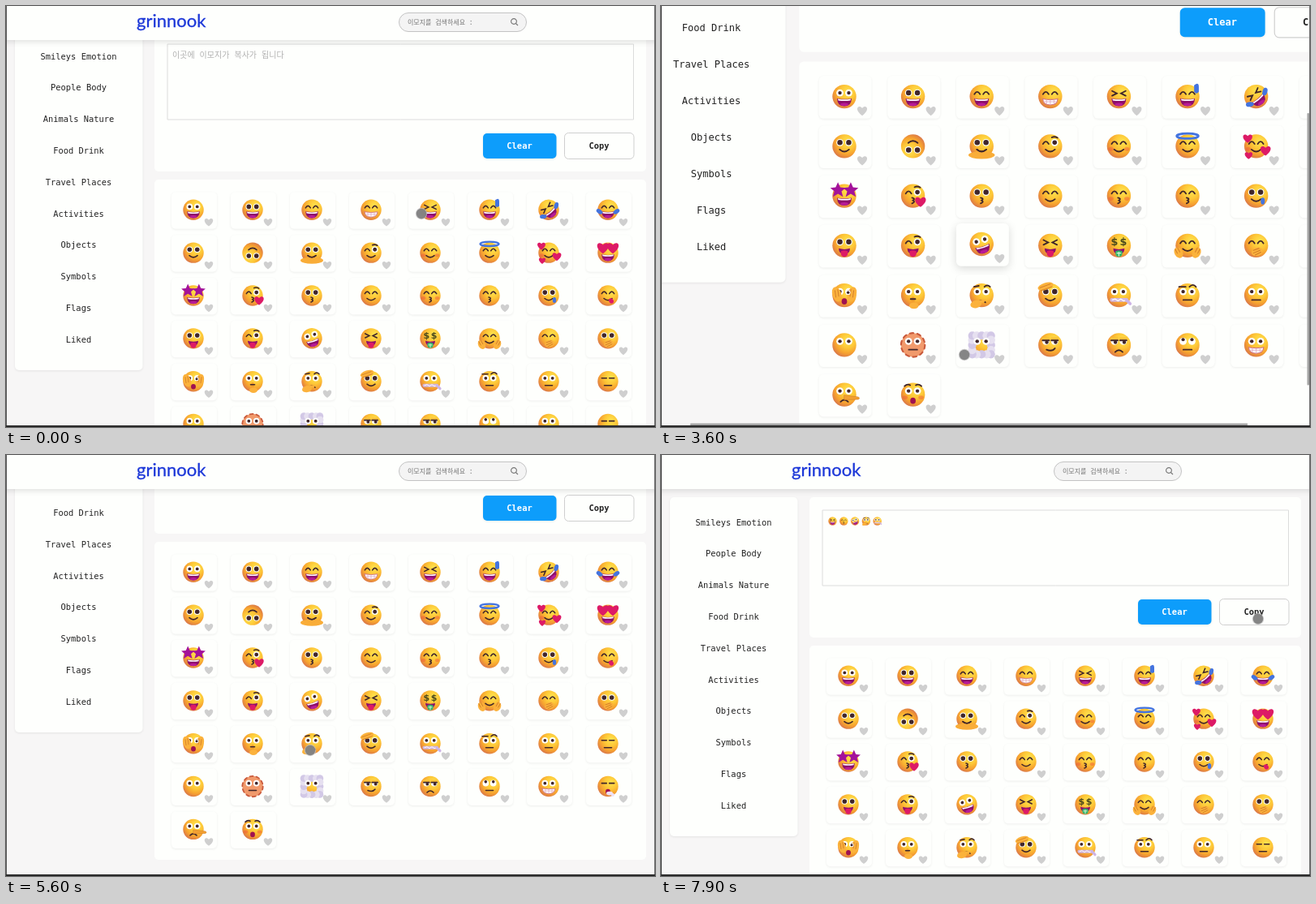
Animation of 800x519 px, one loop 8 s. Source, as an HTML page with a canvas:

```html
<!DOCTYPE html>
<html lang="ko">
<head>
<meta charset="utf-8">
<style>
html, body { margin: 0; width: 100%; height: 100%; overflow: hidden; background: #f7f6f6; }
canvas { display: block; }
</style>
</head>
<body>
<canvas id="stage" width="800" height="519"></canvas>
<script>
const ctx = document.getElementById('stage').getContext('2d');
const LOOP = 8000, MAX_SCROLL = 128, PAGE_HEIGHT = 647;
const INK = '#40262a', PAPER = '#fefffd', PINK = '#dd1a66', BLUE = '#4474df', HAND = '#fbb23c';
const MOUTH = '#8d0f6b', CREASE = '#cf7a28';
const MONO = '"DejaVu Sans Mono", "Noto Sans CJK KR", monospace';
const HEART = 'M0 5C-10 -2 -4 -8 0 -3.2C4 -8 10 -2 0 5Z';
const STAR = 'M0 -6L1.8 -2L6 -1.6L2.8 1.2L4 5.5L0 3L-4 5.5L-2.8 1.2L-6 -1.6L-1.8 -2Z';
const MENU = ['Smileys Emotion', 'People Body', 'Animals Nature', 'Food Drink', 'Travel Places',
  'Activities', 'Objects', 'Symbols', 'Flags', 'Liked'];

// Each face: eyes, mouth, then any extras.
const FACES = ('Wg Dg Ag At Xg Agd Xgrj Agj ' +
  'Ds Dsu Dsm Ks Asb Ash Asbe Hg ' +
  'Sg Kkl Dk As Akb Ak Dst Ay ' +
  'DT KT Wgi XT MG Asa Anc Dnc ' +
  'Wop Wnf Wrq Dsv Wz Wfw Wf Lf ' +
  'Wn WfD WnC Vm Vr Uf Wt Lox ' +
  'WrN WoB').split(' ');

// [time, zoom, x, y] of the view and [time, x, y] of the pointer
const VIEW = [[0, 1, 0, 21], [500, 1, 0, 21], [800, 1, 0, 0], [3150, 1, 0, 0], [3350, 1, 0, 128],
  [3600, 1.159, 36, 176], [4100, 1.199, 43.4, 213], [4700, 1.199, 43.4, 213], [5200, 1, 0, 128],
  [7140, 1, 0, 128], [7190, 1, 0, 0]];
const POINTER = [[0, 512, 256], [900, 512, 256], [1200, 600, 364], [1450, 595, 376], [1850, 595, 376],
  [2400, 374, 430], [4000, 374, 430], [4550, 419, 362], [5100, 419, 362], [5550, 375, 364],
  [6000, 375, 364], [6500, 521, 360], [6850, 521, 360], [7200, 648, 245], [7700, 736, 202]];
const PICKS = [[400, 4], [1500, 21], [2600, 26], [5700, 34], [6700, 36]];
const HOVERS = [[300, 1350, 4], [1350, 2050, 21], [2300, 4200, 26], [5600, 6100, 34], [6450, 6950, 36]];
const SCROLLING = [[500, 1500], [3150, 4300], [7050, 7750]];

function track(keys, t) {
  const i = keys.findIndex(k => k[0] > t);
  if (i < 0) return keys.at(-1).slice(1);
  const a = keys[i - 1], b = keys[i], u = (t - a[0]) / (b[0] - a[0]), e = u * u * (3 - 2 * u);
  return a.slice(1).map((v, j) => v + (b[j + 1] - v) * e);
}
const pulse = (t, a, b) => Math.max(0, Math.min(1, (t - a) / 150, (b - t) / 150));

const paths = {};
function path(d, fill, stroke, width = 1.6) {
  const p = paths[d] ??= new Path2D(d);
  if (fill) { ctx.fillStyle = fill; ctx.fill(p); }
  if (stroke) { ctx.strokeStyle = stroke; ctx.lineWidth = width; ctx.stroke(p); }
}
const line = d => path(d, null, INK);
function oval(x, y, rx, ry, fill, angle = 0) {
  ctx.beginPath();
  ctx.ellipse(x, y, rx, ry, angle, 0, 7);
  ctx.fillStyle = fill;
  ctx.fill();
}
const dot = (x, y, r, fill) => oval(x, y, r, r, fill);
function at(x, y, draw, scale = 1, angle = 0) {
  ctx.save();
  ctx.translate(x, y);
  ctx.rotate(angle);
  ctx.scale(scale, scale);
  draw();
  ctx.restore();
}
function box(x, y, w, h, r, fill, stroke, shadow = 0, drop = 1, depth = .08) {
  ctx.save();
  ctx.beginPath();
  ctx.roundRect(x, y, w, h, r);
  ctx.fillStyle = fill;
  if (shadow) Object.assign(ctx, { shadowColor: `rgba(0,0,0,${depth})`, shadowBlur: shadow, shadowOffsetY: drop });
  ctx.fill();
  ctx.restore();
  if (stroke) { ctx.strokeStyle = stroke; ctx.lineWidth = 1; ctx.stroke(); }
}
function text(s, x, y, font, color, align = 'center') {
  Object.assign(ctx, { font, fillStyle: color, textAlign: align, textBaseline: 'alphabetic' });
  ctx.fillText(s, x, y);
}
const heart = (x, y, scale, color = PINK) => at(x, y, () => path(HEART, color), scale);
const ball = (r, dx = 0, dy = 0) => { dot(0, 0, 3.8, '#fff'); dot(dx, dy, r, INK); };
const arcEye = () => line('M-3 1.5Q0 -3.5 3 1.5');

const EYES = {
  W: () => ball(1.9),
  D: () => ball(2.8),
  A: arcEye,
  X: x => line(x < 0 ? 'M-2.5 -2L2.5 .5L-2.5 3' : 'M2.5 -2L-2.5 .5L2.5 3'),
  K: x => x < 0 ? arcEye() : (ball(2.4), line('M-3 -5.5Q0 -7 3 -5')),
  H: x => heart(x * .3, -1.5, 1.3),
  S: x => at(x * .45, -2.5, () => path(STAR, '#a3129a'), 1.35),
  M: () => text('$', 0, 4, 'bold 11px "DejaVu Sans", sans-serif', '#4d4a1c'),
  L: () => line('M-3 0L3 0'),
  V: () => { ball(1.9, 1, 1); path('M-4.2 -4.2H4.2V-.8H-4.2Z', '#fbc23a'); line('M-3.5 -1H3.5'); },
  U: () => ball(1.8, 0, -1.8)
};
const tongue = color => {
  path('M-6 3Q0 5 6 3Q6 9 0 9Q-6 9 -6 3Z', MOUTH);
  path('M-3.6 6Q0 4 3.6 6V9Q3 12 0 12Q-3 12 -3.6 9Z', color);
};
const MOUTHS = {
  g() {
    path('M-7.8 2Q0 3.6 7.8 2Q7.5 10.3 0 10.3Q-7.5 10.3 -7.8 2Z', MOUTH);
    path('M-7 2.4Q0 4 7 2.4L6.4 4.2Q0 5.2 -6.4 4.2Z', '#fff');
    oval(0, 8.4, 4.2, 1.7, '#b81a98');
  },
  t() {
    path('M-8 2.5Q0 4 8 2.5Q7.5 9 0 9Q-7.5 9 -8 2.5Z', '#fff', '#d0707c', .9);
    path('M-7 5.5H7M-4 3V8M0 3.5V9M4 3V8', null, '#dba3bb', .7);
  },
  s: () => line('M-5 3.5Q0 8 5 3.5'),
  k: () => line('M-1 2Q3 3 0 4.8Q3 6.5 -1 8'),
  T: () => tongue(PINK),
  G() { tongue('#35b56a'); path('M-2 8H2M0 7V11', null, '#d6f5d8', 1); },
  f: () => line('M-4.5 5H4.5'),
  r: () => line('M-4 7.5Q0 3.5 4 7.5'),
  m: () => line('M-4 5Q2 7.5 5 3.5'),
  y() { MOUTHS.s(); oval(4, 6.5, 2.8, 3.3, PINK, -.5); },
  z() {
    path('M-7.5 5H8', null, '#d3b6dc', 4);
    path('M-7 5L-4 4L-1 6L2 4L5 6L8 5', null, '#fff', 1);
    path('M8 5L12 9', null, '#cdb4e6', 3.2);
  },
  o: () => oval(0, 6.5, 2.9, 3.3, '#a01250'),
  n() {}
};
const EXTRAS = {
  b() { for (const x of [-8.5, 8.5]) oval(x, 3, 2.8, 2, 'rgba(240,85,60,.45)'); },
  d: () => path('M7 -12Q12 -16 12 -10V-5Q9.5 -1.5 7 -5Z', BLUE),
  j() { for (const s of [-1, 1]) oval(s * 10.5, 2, 4.2, 2.6, BLUE, -s * .6); },
  h() {
    ctx.beginPath();
    ctx.ellipse(0, -10.8, 11.5, 2.7, 0, 0, 7);
    ctx.strokeStyle = BLUE;
    ctx.lineWidth = 2.4;
    ctx.stroke();
  },
  e() { heart(-9, -8, .9); heart(10, 5, 1); heart(-8, 10, .75); },
  l: () => heart(8, 6.5, 1.05),
  t: () => oval(7, 5.5, 2.2, 3.6, BLUE),
  m() { oval(0, 9.5, 14, 4, '#f9ad38'); MOUTHS.s(); },
  a() {
    for (const s of [-1, 1]) at(s * 9.5, 7.5, () => {
      oval(0, 0, 4.4, 6, HAND);
      path('M-1.5 -5V0M1.5 -5V0', null, CREASE, .8);
    }, 1, s * .5);
  },
  c() { oval(1, 6.5, 6, 4.4, HAND, -.3); path('M-3 5L3 3M-3 8L4 5M-1 10L5 7', null, CREASE, .9); },
  p() {
    for (const s of [-1, 1]) {
      oval(s * 8, -1, 4.8, 8, HAND, s * .3);
      path(`M${s * 7} -6L${s * 6} 1M${s * 10} -5L${s * 9} 2`, null, CREASE, .8);
    }
    dot(4, -3, 2.5, '#fff');
    dot(4, -3, 1.5, INK);
  },
  f() { path('M0 3V9', null, '#f3a02e', 3.4); oval(1, 11, 5, 3.4, HAND); line('M-2.5 4H2.5'); },
  q() { line('M-8 -9L-3 -10M3 -9Q6 -12 9 -9'); oval(-6, 9.5, 6, 4, HAND, -.2); path('M-8 8L2 6', null, HAND, 3); },
  v() { oval(-5, -9.5, 8.5, 3.8, HAND, -.3); path('M-11 -8L0 -12M-10 -5L2 -9', null, CREASE, .8); },
  w: () => line('M-9 -9H-2M2 -9Q6 -13 9 -9'),
  x() { oval(2, 8.5, 4, 2.4, '#eee2f7'); dot(6, 10.5, 2, '#eee2f7'); },
  C() {
    for (let i = 0; i < 16; i++) {
      const edge = v => Math.max(-1, Math.min(1, 1.4 * v)) * 10, a = i * Math.PI / 8;
      dot(edge(Math.cos(a)), edge(Math.sin(a)), 4.4, i % 2 ? '#e6e0f0' : '#d2c8e6');
    }
  },
  N: () => path('M0 .5L15 2.5Q17 4 15 5L0 5.5Z', '#f2a032', CREASE, .5),
  B() { EXTRAS.b(); line('M-9 -9Q-6 -12 -3 -10M3 -10Q6 -12 9 -9'); }
};

const skin = ctx.createRadialGradient(4, -5, 1, 3, -4, 18);
skin.addColorStop(0, '#ffe14d');
skin.addColorStop(.4, '#fdc737');
skin.addColorStop(.72, '#f6a130');
skin.addColorStop(1, '#d8754a');

function face(spec, x, y, scale = 1) {
  const [eyes, mouth, ...extras] = spec, has = c => extras.includes(c);
  const angle = has('u') ? Math.PI : has('r') ? -.7 : has('i') ? -.3 : 0;
  at(x, y, () => {
    ctx.lineCap = 'round';
    dot(0, 0, 12.7, has('D') ? '#f19a6c' : skin);
    if (has('D')) {
      ctx.setLineDash([4, 4]);
      ctx.strokeStyle = '#c95a3c';
      ctx.lineWidth = 1.8;
      ctx.stroke();
      ctx.setLineDash([]);
    }
    if (has('C')) EXTRAS.C();
    for (const side of [-4.7, 4.7]) at(side, -3.9, () => EYES[eyes](side));
    MOUTHS[mouth]();
    for (const c of extras) if (c !== 'C') EXTRAS[c]?.();
    ctx.lineCap = 'butt';
  }, scale, angle);
}

function header(y) {
  box(-20, y - 20, 840, 62, 0, PAPER, null, 7, 2, .13);
  Object.assign(ctx, { strokeStyle: '#1c37d8', lineWidth: .3 });
  text('grinnook', 161, y + 26, '22px Lato, sans-serif', '#1c37d8', 'left');
  ctx.strokeText('grinnook', 161, y + 26);
  box(484.5, y + 8.5, 157, 23, 11.5, '#f4f4f4', '#c3c3c3');
  text('이모지를 검색하세요 :', 495, y + 23, '8px ' + MONO, '#777', 'left');
  at(626, y + 19, () => path('M3.4 0A3.4 3.4 0 1 1 -3.4 0A3.4 3.4 0 1 1 3.4 0M2.5 2.5L5 5', null, '#777', 1.1));
}

function page(t) {
  box(11, 52, 157.5, 418, 5, PAPER, null, 3);
  MENU.forEach((s, i) => text(s, 89.5, 86.5 + i * 38.8, '10.4px ' + MONO, '#222'));

  box(183, 52, 606, 173, 5, PAPER);
  box(199, 68, 574.5, 93, 0, PAPER, '#dcdcdc');
  const picked = PICKS.filter(p => t >= p[0]);
  if (!picked.length) text('이곳에 이모지가 복사가 됩니다', 205, 85, '10px ' + MONO, '#b0b0b0', 'left');
  picked.forEach(([, i], n) => face(FACES[i], 211.5 + n * 13.8, 81.5, .41));
  box(588, 178, 90.5, 31, 5, '#0d9dfb', null, 3);
  text('Clear', 633, 196.5, 'bold 10.4px ' + MONO, '#fff');
  box(688.5, 177.5, 85.5, 32, 5, PAPER, '#cfcfcf');
  text('Copy', 731, 196.5, 'bold 10.4px ' + MONO, '#222');

  box(183, 235, 606, 392, 5, PAPER);
  FACES.forEach((spec, i) => {
    const hover = HOVERS.reduce((v, [a, b, n]) => n === i ? Math.max(v, pulse(t, a, b)) : v, 0);
    const x = 231 + i % 8 * 73, y = 272.3 + (i >> 3) * 52.85 - 1.7 * hover;
    box(x - 27, y - 22, 56, 45.5, 5, PAPER, null, 3 + 8 * hover, 1 + 2 * hover, .07 + .08 * hover);
    face(spec, x, y);
    heart(x + 19, y + 15.5, .96, '#cfcfcf');
  });
}

function scrollbars(alpha, zoom, x, y) {
  ctx.globalAlpha = alpha;
  const unit = 485 / PAGE_HEIGHT;
  box(796.5, y * unit, 2.5, 519 / zoom * unit, 1, '#a5a5a5');
  if (zoom > 1.01) box(x, 514.5, 800 / zoom - 3, 2.5, 1, '#a5a5a5');
  ctx.globalAlpha = 1;
}

function frame() {
  const t = performance.now() % LOOP;
  const [zoom, x, y] = track(VIEW, t), [px, py] = track(POINTER, t);
  ctx.fillStyle = '#f7f6f6';
  ctx.fillRect(0, 0, 800, 519);
  ctx.save();
  ctx.scale(zoom, zoom);
  ctx.translate(-x, -y);
  page(t);
  header(Math.min(y, MAX_SCROLL));
  ctx.restore();
  scrollbars(Math.max(...SCROLLING.map(([a, b]) => pulse(t, a, b))), zoom, x, y);
  dot(px, py, 7.2, 'rgba(190,190,190,.8)');
  dot(px, py, 6.2, 'rgba(125,125,125,.9)');
  box(0, 0, 1, 519, 0, '#555');
  box(799, 0, 1, 519, 0, '#777');
  box(0, 517, 800, 2, 0, '#2b2b2b');
  requestAnimationFrame(frame);
}
frame();
</script>
</body>
</html>
```
